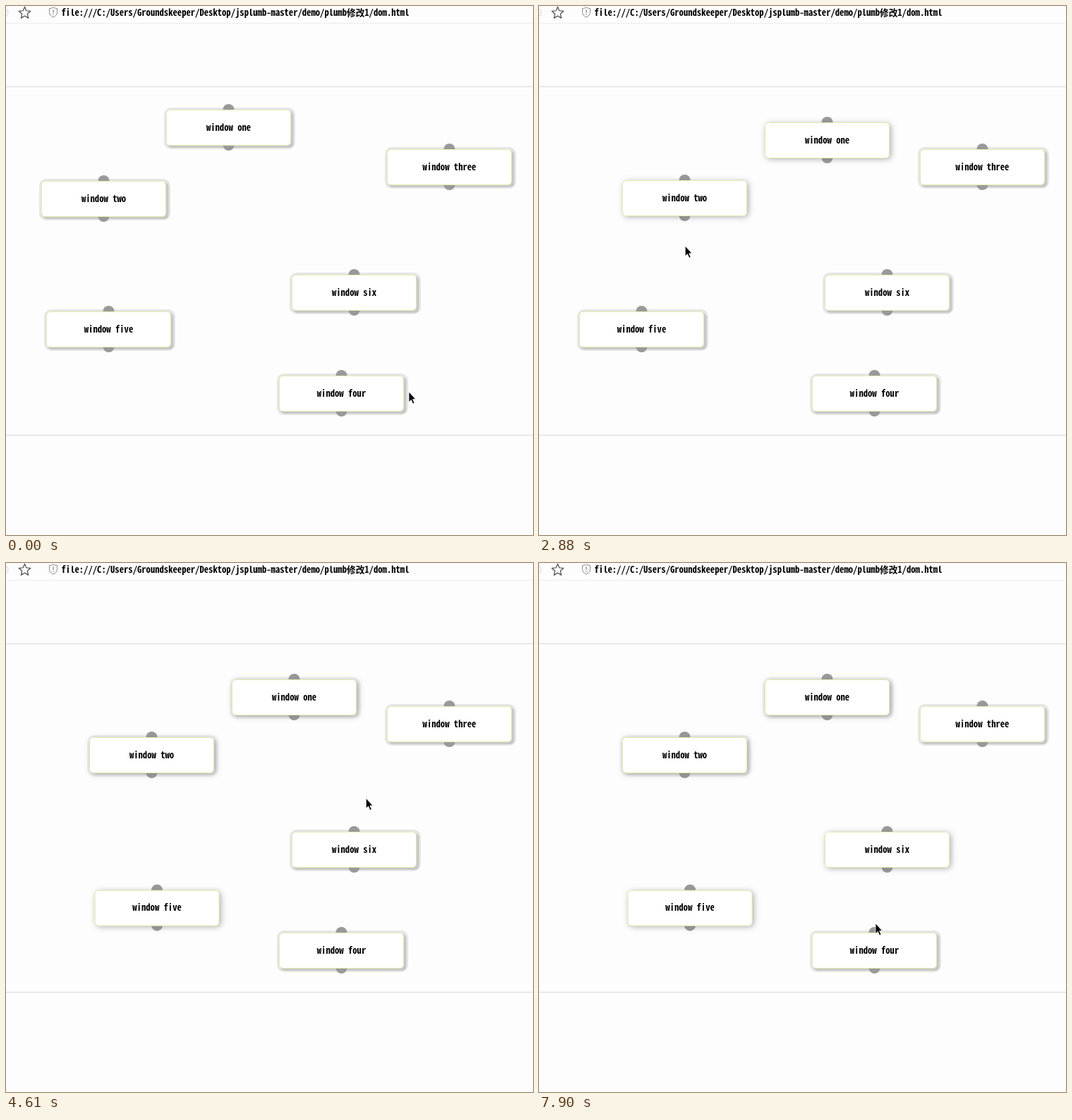
Recreate the animation shown at these times as an HTML page. Size 747x750 px, loop 7.99 s.

```html
<!DOCTYPE html>
<html lang="en">
<head>
<meta charset="utf-8">
<title>Draggable windows</title>
<style>
  html, body { margin: 0; width: 100%; height: 100%; overflow: hidden; background: #fdfdfd; }
  svg { display: block; width: 100%; height: 100%; }
  text { font: 700 12.65px "Noto Sans Mono CJK SC", "Noto Sans Mono CJK JP", "Noto Sans CJK SC", "Noto Sans Mono", monospace; }
  .box { fill: #fff; stroke: #e2ecac; }
  .hover .box { stroke: #ffa51f; fill-opacity: .95; }
  .hover text { fill: #ffa51f; }
  .shadow { fill: #777; fill-opacity: .6; filter: url(#soft); }
  .hover .shadow { fill: #222; fill-opacity: .85; }
</style>
</head>
<body>
<svg viewBox="0 0 747 750">
  <defs>
    <filter id="soft" x="-20%" y="-50%" width="140%" height="200%"><feGaussianBlur stdDeviation="4"/></filter>
  </defs>
  <rect width="747" height="750" fill="#fdfdfd"/>
  <path d="M0 24.5H747" stroke="#ececec"/>
  <path d="M0 114.5H747M0 608.5H747" stroke="#d9d9d9"/>
  <circle cx="-3" cy="9.5" r="6" fill="none" stroke="#d0d0d0"/>
  <path id="star" fill="none" stroke="#4a4a4a" stroke-width="1.2" stroke-linejoin="round"/>
  <path d="M61.5 3.5q3 0 5.500-1.5 2.500 1.5 5.500 1.5v5q0 5-5.500 7.500-5.500-2.500-5.500-7.500z" fill="none" stroke="#888"/>
  <path d="M67 5v5M67 11.5v1.5" stroke="#888" stroke-width="1.2"/>
  <text x="78.5" y="13.5">file:///C:/Users/Groundskeeper/Desktop/jsplumb-master/demo/plumb修改1/dom.html</text>
  <g id="rings"></g>
  <g id="ends" fill="#999"></g>
  <g id="boxes"></g>
  <g id="link">
    <path id="wire" fill="none" stroke="#777" stroke-width="1.8" stroke-dasharray="8 5 2 5"/>
    <g id="plug">
      <circle r="8" fill="#999"/>
      <path d="M-6.5 -13L0 -1L6.5 -13L0 -7Z" fill="#777" stroke="#ddd" stroke-width=".7"/>
    </g>
  </g>
  <path id="arrow" d="M0 0V14.5L3.3 11.5L5.7 17L8 16L5.6 10.6H9.8Z" fill="#000" stroke="#fff" stroke-width=".8"/>
  <path id="hand" d="M-1.5 1Q0 -1 1.5 1V7Q7 5 9.7 9.5V13L8 19.5H0L-4.5 12.5Q-5.5 10 -3.5 10L-1.5 12ZM1.5 7V10M4.3 7V10M7 8V10.5" fill="#fff" stroke="#000" stroke-width="1.1" stroke-linejoin="round"/>
</svg>
<script>
const LOOP = 7990, W = 177, H = 50, MID = 88;
const $ = id => document.getElementById(id);

// cursor path: time, x, y
const path = [
  [100, 571, 547], [720, 320, 181], [940, 297, 215], [1110, 390, 214], [1680, 413, 199],
  [1910, 160, 263], [2060, 228, 316], [2190, 175, 226], [2490, 255, 263], [2700, 228, 262],
  [3120, 191, 459], [3300, 245, 411], [3515, 278, 243], [3720, 288, 225], [3990, 272, 386],
  [4040, 255, 416], [4250, 260, 490], [4500, 380, 380], [4620, 512, 330], [4910, 405, 228],
  [5090, 405, 221], [5300, 405, 221], [5500, 300, 340], [5600, 311, 357], [5800, 420, 366],
  [6040, 482, 340], [6350, 380, 310], [6600, 300, 345], [6830, 206, 300], [6990, 206, 300],
  [7350, 370, 350], [7620, 450, 410], [7770, 470, 455], [7900, 477, 511]
];

// drag: start, end, grab point, lag
const windows = [
  { name: "one", x: 227, y: 147, drag: [720, 1680, 93, 34, 0], used: 650 },
  { name: "two", x: 50, y: 248, drag: [1910, 2700, 110, 15, 0], used: 1860 },
  { name: "three", x: 540, y: 203 },
  { name: "four", x: 387, y: 524 },
  { name: "five", x: 57, y: 433, drag: [3120, 4290, 134, 26, 50], used: 3020 },
  { name: "six", x: 405, y: 381, used: 7500 }
];

// wires pulled from a window's lower endpoint
const pulls = [{ from: 0, start: 5300, end: 6350 }, { from: 1, start: 6990, end: 7460 }];

function add(parent, tag, attrs) {
  const el = document.createElementNS("http://www.w3.org/2000/svg", tag);
  for (const k in attrs) el.setAttribute(k, attrs[k]);
  return parent.appendChild(el);
}

const move = (el, x, y) => el.setAttribute("transform", `translate(${x.toFixed(2)} ${y.toFixed(2)})`);
const show = (el, on) => el.setAttribute("visibility", on ? "visible" : "hidden");

const star = Array.from({ length: 10 }, (_, i) => {
  const r = i % 2 ? 4 : 8.8, a = i * Math.PI / 5;
  return [26.5 + r * Math.sin(a), 10 - r * Math.cos(a)];
});
$("star").setAttribute("d", "M" + star.join("L") + "Z");

for (const w of windows) {
  w.ring = add($("rings"), "g", {});
  add(w.ring, "rect", { x: -3, y: -3, width: W + 9, height: H + 9, rx: 10, fill: "#e6e6e6" });
  add(w.ring, "rect", { x: 2, y: 2, width: W + 1.5, height: H + 2, rx: 6, fill: "#c8c8c8" });
  w.ends = add($("ends"), "g", {});
  for (const cy of [0, H]) add(w.ends, "circle", { cx: MID + .5, cy, r: 8 });
  w.g = add($("boxes"), "g", {});
  w.shadow = add(w.g, "rect", { class: "shadow", x: 2, y: 2, width: W, height: H, rx: 6 });
  add(w.g, "rect", { class: "box", x: .5, y: .5, width: W - 1, height: H, rx: 5 });
  add(w.g, "text", { x: MID + .5, y: 29.5, "text-anchor": "middle" }).textContent = "window " + w.name;
}

const slope = (i, k) => (path[i + 1][k] - path[i][k]) / (path[i + 1][0] - path[i][0]);

// shape-preserving tangent, so the path never overshoots its points
function tangent(i, k) {
  if (i === 0 || i === path.length - 1) return 0;
  const a = slope(i - 1, k), b = slope(i, k);
  return a * b <= 0 ? 0 : 2 * a * b / (a + b);
}

function cursorAt(t) {
  const last = path.length - 1;
  if (t <= path[0][0]) return path[0].slice(1);
  if (t >= path[last][0]) return path[last].slice(1);
  let i = 0;
  while (path[i + 1][0] <= t) i++;
  const d = path[i + 1][0] - path[i][0], u = (t - path[i][0]) / d, v = 1 - u;
  return [1, 2].map(k =>
    path[i][k] * (1 + 2 * u) * v * v + path[i + 1][k] * u * u * (3 - 2 * u) +
    d * u * v * (tangent(i, k) * v - tangent(i + 1, k) * u));
}

function place(w, t) {
  if (!w.drag) return [w.x, w.y];
  const [start, end, gx, gy, lag] = w.drag;
  if (t < start + lag) return [w.x, w.y];
  const [x, y] = cursorAt(Math.min(t - lag, end - lag));
  return [x - gx, y - gy];
}

function draw(t) {
  const [cx, cy] = cursorAt(t);
  const pull = pulls.find(p => t >= p.start && t < p.end);
  let pointing = false;

  windows.forEach((w, i) => {
    const [x, y] = w.pos = place(w, t);
    const over = !pull && cx >= x && cx <= x + W && cy >= y && cy <= y + H;
    const onEnd = !pull && [y, y + H].some(e => Math.hypot(cx - x - MID, cy - e) < 9);
    const fresh = !over && (w.used === undefined || t < w.used);
    const faded = i < 2 && t > 3800;
    pointing = pointing || over || onEnd;
    for (const el of [w.ring, w.ends, w.g]) move(el, x, y);
    w.g.setAttribute("class", over ? "hover" : "");
    show(w.ring, fresh || faded);
    w.ring.setAttribute("opacity", fresh ? 1 : .4);
    show(w.shadow, !fresh);
  });

  show($("link"), pull);
  if (pull) {
    const [x, y] = windows[pull.from].pos;
    const sx = x + MID, sy = y + H + 1, ex = cx - 1, ey = cy - 7, bend = 130;
    $("wire").setAttribute("d", `M${sx} ${sy}C${sx} ${sy + bend} ${ex} ${ey - bend} ${ex} ${ey}`);
    move($("plug"), ex, ey);
  }

  move($("arrow"), cx, cy);
  move($("hand"), cx, cy);
  show($("arrow"), !pointing);
  show($("hand"), pointing);
}

const begin = performance.now();
function tick() {
  draw((performance.now() - begin) % LOOP);
  requestAnimationFrame(tick);
}
tick();
</script>
</body>
</html>
```
